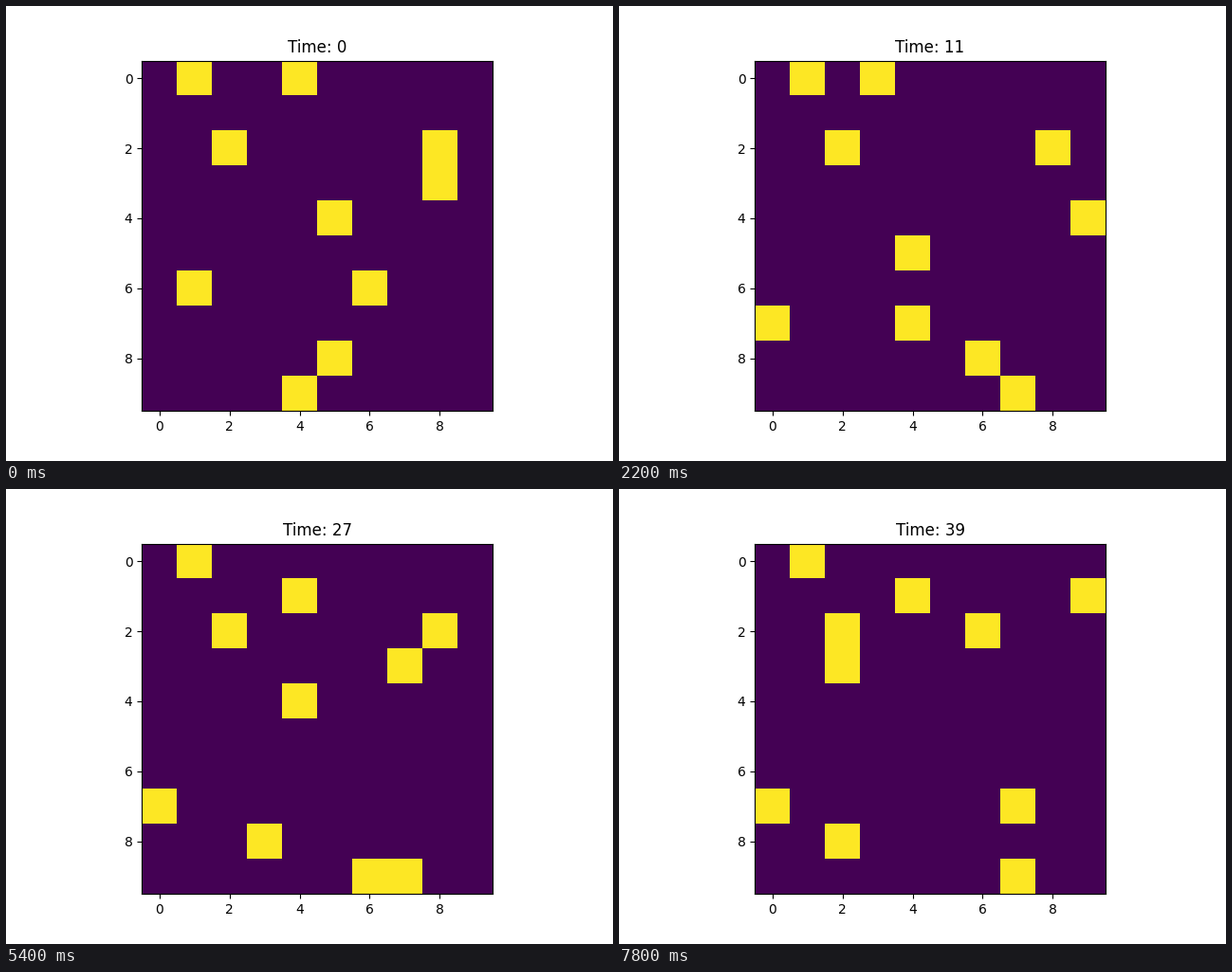
Write a matplotlib script that moves like this. It is 640 px wide and 480 px high and loops after 8 s.

```python
import numpy as np
import matplotlib.pyplot as plt
from matplotlib.animation import FuncAnimation

SIZE = 10
STEPS = 40
KEYS = [0, 5, 11, 12, 17, 24, 30, 36, 39]

# Each walker: {key index: (column, row)}; it rests where no key is given
WALKERS = [
    {0: (1, 0)},
    {0: (2, 2)},
    {0: (4, 0), 2: (3, 0), 6: (4, 1)},
    {0: (8, 2), 1: (7, 2), 2: (8, 2), 6: (8, 1), 7: (9, 0), 8: (9, 1)},
    {0: (8, 3), 2: (9, 4), 5: (7, 3), 6: (6, 2)},
    {0: (5, 4), 1: (4, 5), 4: (3, 5), 5: (4, 4), 6: (3, 3), 7: (2, 3)},
    {0: (1, 6), 1: (0, 7)},
    {0: (6, 6), 1: (6, 9), 2: (7, 9)},
    {0: (5, 8), 2: (4, 7), 4: (3, 8), 7: (2, 8)},
    {0: (4, 9), 2: (6, 8), 3: (6, 9), 6: (6, 8), 7: (7, 7)},
]


def track(stops):
    """Fill the rests, then walk between keys in whole cells."""
    cells = [stops[max(i for i in stops if i <= k)] for k in range(len(KEYS))]
    times = np.arange(STEPS)
    lines = [np.interp(times, KEYS, axis) for axis in zip(*cells)]
    return np.floor(np.array(lines) + 0.5).astype(int)


tracks = np.array([track(stops) for stops in WALKERS])


def grid_at(t):
    grid = np.zeros((SIZE, SIZE))
    cols, rows = tracks[:, :, t].T
    grid[rows, cols] = 1
    return grid


fig, ax = plt.subplots(figsize=(6.4, 4.8), dpi=100)
image = ax.imshow(grid_at(0), cmap="viridis", vmin=0, vmax=1,
                  interpolation="nearest")
title = ax.set_title("Time: 0")


def update(t):
    image.set_data(grid_at(t))
    title.set_text(f"Time: {t}")
    return image, title


anim = FuncAnimation(fig, update, frames=STEPS, interval=200, repeat=True,
                     repeat_delay=0, blit=False)
plt.show()
```
